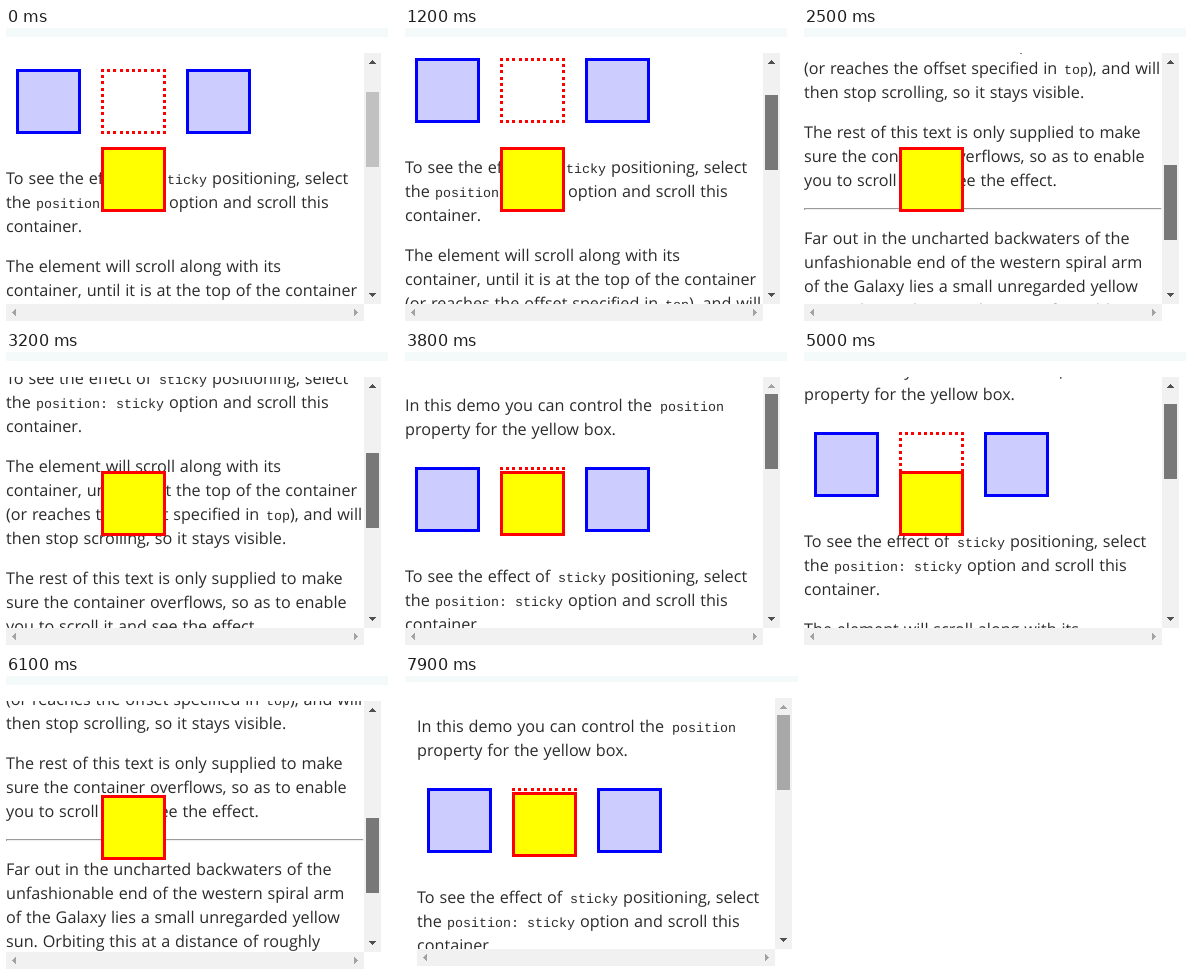
An HTML page with a canvas for the animation above (8000 ms loop, 393 by 296 pixels).

```html
<!DOCTYPE html>
<html lang="en">
<head>
<meta charset="utf-8">
<title>Sticky box demo</title>
<style>
  html, body { margin: 0; width: 100%; height: 100%; overflow: hidden; background: #fff; }
  canvas { display: block; }
</style>
</head>
<body>
<canvas id="stage" width="393" height="296"></canvas>
<script>
const ctx = document.getElementById('stage').getContext('2d');
const LOOP = 8000;
const VIEW = { w: 358, h: 251, bar: 17 };
const BODY = '16.2px "Open Sans", "Noto Sans", sans-serif';
const CODE = '13.333px "Liberation Mono", monospace';
const RED = '#ff0000';

// [baseline, x, text, isCode]
const TEXT = [
  [34, 0, 'In this demo you can control the'], [34, 255, 'position', true],
  [58, 0, 'property for the yellow box.'],
  [205, 0, 'To see the effect of'], [205, 153, 'sticky', true],
  [205, 206, 'positioning, select'],
  [229, 0, 'the'], [229, 30, 'position: sticky', true],
  [229, 163, 'option and scroll this'],
  [253, 0, 'container.'],
  [293, 0, 'The element will scroll along with its'],
  [317, 0, 'container, until it is at the top of the container'],
  [341, 0, '(or reaches the offset specified in'], [341, 260, 'top', true],
  [341, 284, '), and will'],
  [365, 0, 'then stop scrolling, so it stays visible.'],
  [405, 0, 'The rest of this text is only supplied to make'],
  [429, 0, 'sure the container overflows, so as to enable'],
  [453, 0, 'you to scroll it and see the effect.'],
  [511, 0, 'Far out in the uncharted backwaters of the'],
  [535, 0, 'unfashionable end of the western spiral arm'],
  [559, 0, 'of the Galaxy lies a small unregarded yellow'],
  [583, 0, 'sun. Orbiting this at a distance of roughly'],
  [607, 0, 'ninety-two million miles is an utterly']
];

// [time, scroll offset]
const SCROLL = [
  [0, 74], [1000, 74], [1400, 96], [1800, 136], [2200, 238], [2500, 320],
  [2700, 350], [2800, 350], [3300, 160], [3800, 0], [4800, 0], [5100, 52],
  [5500, 160], [5800, 262], [6100, 337], [6200, 337], [6600, 0], [LOOP, 0]
];

const IDLE = '#c1c1c1', HOVER = '#a8a8a8', PRESSED = '#787878';
const THUMB = [
  [0, IDLE], [200, HOVER], [600, IDLE], [800, HOVER],
  [1100, PRESSED], [6800, HOVER], [7700, IDLE], [7900, HOVER]
];

function scrollAt(t) {
  const i = SCROLL.findIndex(key => key[0] > t);
  const [t0, a] = SCROLL[i - 1], [t1, b] = SCROLL[i];
  return Math.round(a + (b - a) * (t - t0) / (t1 - t0));
}

function rect(x, y, w, h, color) {
  ctx.fillStyle = color;
  ctx.fillRect(x, y, w, h);
}

function box(x, y, border, fill) {
  rect(x, y, 65, 65, border);
  rect(x + 3, y + 3, 59, 59, fill);
}

function dottedBox(x, y) {
  for (let i = 0; i <= 10; i++) {
    const d = Math.round(i * 6.2);
    rect(x + d, y, 3, 3, RED);
    rect(x + d, y + 62, 3, 3, RED);
    rect(x, y + d, 3, 3, RED);
    rect(x + 62, y + d, 3, 3, RED);
  }
}

function rule(y) {
  rect(0, y, VIEW.w, 2, '#eeeeee');
  rect(0, y, VIEW.w - 1, 1, '#9a9a9a');
  rect(0, y, 1, 2, '#9a9a9a');
}

// Stepped triangle with its tip at (x, y), pointing along (dx, dy)
function arrow(x, y, dx, dy, enabled) {
  const color = enabled ? '#505050' : '#a3a3a3';
  for (let i = 0; i < 4; i++) {
    const sx = dy ? i : 0, sy = dx ? i : 0;
    rect(x - dx * i - sx, y - dy * i - sy, 2 * sx + 1, 2 * sy + 1, color);
  }
}

function drawContent(scroll) {
  ctx.save();
  ctx.beginPath();
  ctx.rect(0, 0, VIEW.w, VIEW.h);
  ctx.clip();
  ctx.translate(0, -scroll);
  box(10, 90, '#0000ff', '#ccccff');
  box(180, 90, '#0000ff', '#ccccff');
  dottedBox(95, 90);
  rule(475);
  ctx.fillStyle = '#2b2b2b';
  ctx.textRendering = 'geometricPrecision';
  for (const [y, x, text, isCode] of TEXT) {
    ctx.font = isCode ? CODE : BODY;
    ctx.wordSpacing = isCode ? '0px' : '0.6px';
    ctx.fillText(text, x, y);
  }
  ctx.restore();
  box(95, 94, RED, '#ffff00');
}

function drawBars(scroll, thumb) {
  const { w, h, bar } = VIEW;
  rect(w, 0, bar, h, '#f1f1f1');
  rect(0, h, w, bar, '#f1f1f1');
  rect(w + 2, 17 + Math.round(scroll * 0.2955), 13, 75, thumb);
  arrow(w + 8, 7, 0, -1, scroll > 0);
  arrow(w + 8, h - 8, 0, 1, true);
  arrow(6, h + 8, -1, 0, false);
  arrow(w - 7, h + 8, 1, 0, false);
}

function draw(time) {
  // The picture advances in steps of 100 ms
  const t = Math.floor(time % LOOP / 100) * 100;
  const scroll = scrollAt(t);
  const thumb = THUMB.filter(key => key[0] <= t).pop()[1];
  const moved = t >= 7700;
  rect(0, 0, 393, 296, '#ffffff');
  ctx.save();
  ctx.translate(moved ? 12 : 0, moved ? 22 : 25);
  rect(-12, -25, 394, 9, '#f4f9f9');
  drawContent(scroll);
  drawBars(scroll, thumb);
  ctx.restore();
}

const start = performance.now();
function tick() {
  draw(performance.now() - start);
  requestAnimationFrame(tick);
}
tick();
</script>
</body>
</html>
```
